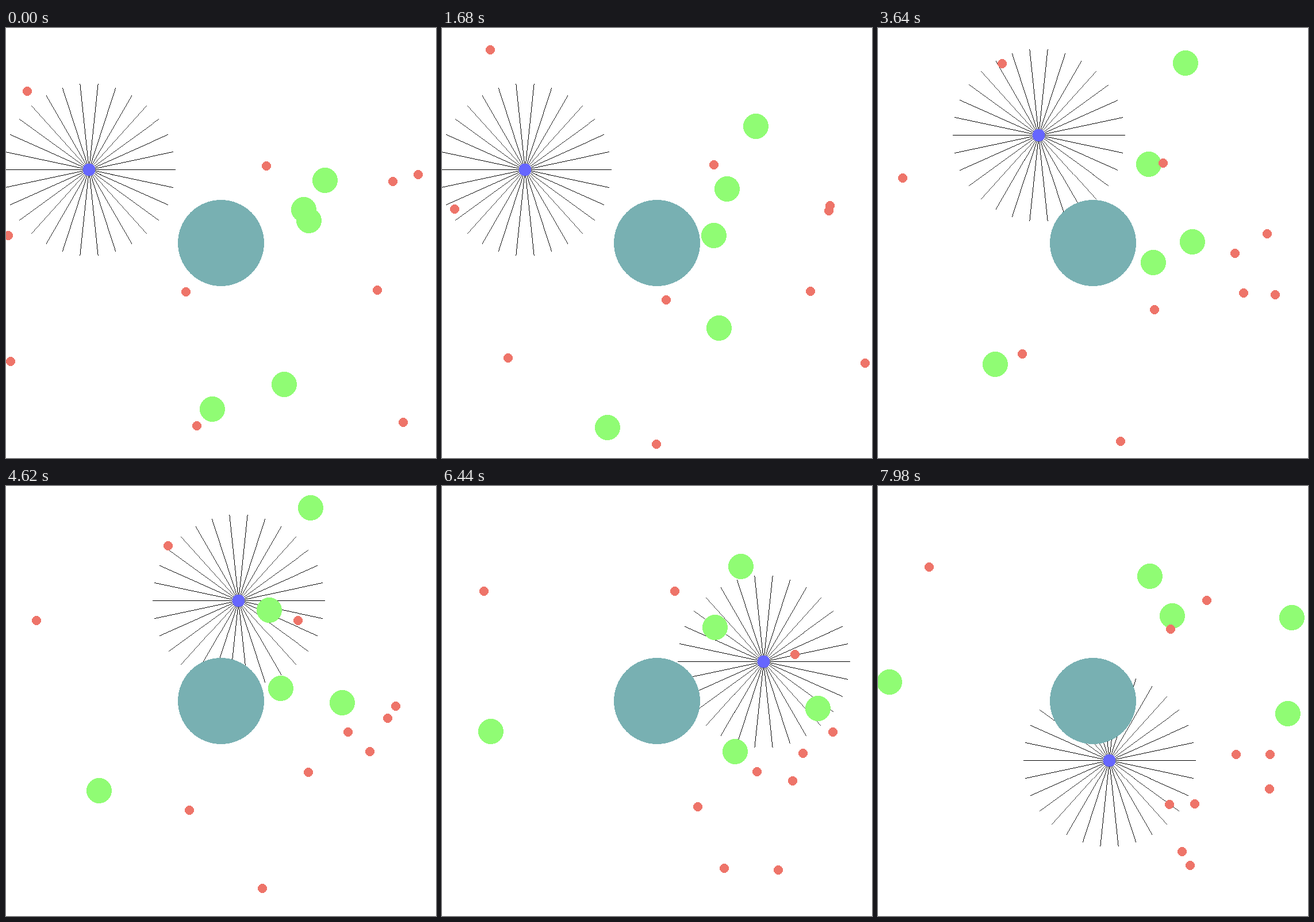
An HTML page for the animation above (8000 ms loop, 748x748 px).

```html
<!DOCTYPE html>
<html lang="en">
<head>
<meta charset="utf-8">
<title>Pursuit</title>
<style>
  html, body { margin: 0; width: 100%; height: 100%; overflow: hidden; background: #fff; }
  svg { display: block; width: 100%; height: 100%; shape-rendering: crispEdges; }
</style>
</head>
<body>
<svg viewBox="0 0 748 748">
  <g id="agent"></g>
  <circle cx="374" cy="374" r="75" fill="#78b0b2"/>
  <g id="food" fill="#90fc74"></g>
  <g id="poison" fill="#ee7469"></g>
</svg>
<script>
const SIZE = 748, STEP_MS = 70, LOOP_MS = 8000;
const CENTER = SIZE / 2, OBSTACLE_R = 75, AGENT_R = 11, RAY_LENGTH = 150, RAYS = 30;

// Bodies start as [x, y, vx, vy], in pixels per step; a caught body takes the next respawn.
const kinds = [
  {
    id: "food", r: 22,
    bodies: [
      [554.5, 265, -0.375, -3.92], [518, 316, -0.909, -1.515], [526.5, 335, -2.46, 1.11],
      [484, 619.5, -0.096, -4.06], [359, 663.2, -2.978, 3.93]
    ],
    respawns: [[583, 541, -3.18, -3.42], [677, 229, 6.13, 0]]
  },
  {
    id: "poison", r: 8,
    bodies: [
      [37.3, 110.3, -4.715, -3.01], [4, 361, 0.745, -1.93], [453, 239.5, 0.826, -0.08],
      [673, 267, 0.08, 1.754], [717, 255, -1.842, 2.627], [313, 458.5, 3.228, 0.597],
      [646, 456, -0.2, 0.096], [8, 580, -4.852, -0.241], [332, 692, 1.728, 1.34],
      [690.6, 686, 1.91, -4.272]
    ],
    respawns: [[616.5, 673.5, -1.94, -0.36]]
  }
];

// The agent rests, then glides smoothly through these [step, x, y] points.
const waypoints = [
  [24, 144.5, 246.5], [36, 174, 220], [52, 279.5, 186.5], [66, 404.9, 199.5],
  [83, 555.5, 257.5], [88, 567, 283], [102, 497.9, 370.5], [114, 402.9, 477.5]
];

function slope(i, axis) {
  const chord = j => (waypoints[j + 1][axis] - waypoints[j][axis]) / span(j);
  const span = j => waypoints[j + 1][0] - waypoints[j][0];
  if (i === 0) return 0;
  if (i === waypoints.length - 1) return chord(i - 1);
  return (chord(i - 1) * span(i) + chord(i) * span(i - 1)) / (span(i - 1) + span(i));
}

function agentAt(step) {
  let i = waypoints.length - 2;
  while (i > 0 && waypoints[i][0] > step) i--;
  const a = waypoints[i], b = waypoints[i + 1], span = b[0] - a[0];
  const u = Math.max(0, (step - a[0]) / span), w = 1 - u;
  return [1, 2].map(k =>
    a[k] * w * w * (1 + 2 * u) + b[k] * u * u * (3 - 2 * u) +
    span * u * w * (slope(i, k) * w - slope(i + 1, k) * u));
}

function bounceOffWalls(body, r) {
  for (const axis of [0, 1]) {
    const speed = Math.abs(body[axis + 2]);
    if (body[axis] < r) body[axis + 2] = speed;
    if (body[axis] > SIZE - r) body[axis + 2] = -speed;
  }
}

function bounceOffObstacle(body, r) {
  const dx = body[0] - CENTER, dy = body[1] - CENTER, distance = Math.hypot(dx, dy);
  const inward = (body[2] * dx + body[3] * dy) / distance;
  if (distance > OBSTACLE_R + r || inward > 0) return;
  body[2] -= 2 * inward * dx / distance;
  body[3] -= 2 * inward * dy / distance;
}

function simulate({ r, bodies, respawns }, steps) {
  const state = bodies.map(body => [...body]);
  let caught = 0;
  for (let step = 1; step <= steps; step++) {
    const [ax, ay] = agentAt(step);
    state.forEach((body, i) => {
      body[0] += body[2];
      body[1] += body[3];
      bounceOffWalls(body, r);
      bounceOffObstacle(body, r);
      const touching = Math.hypot(body[0] - ax, body[1] - ay) < AGENT_R + r;
      if (touching && caught < respawns.length) state[i] = [...respawns[caught++]];
    });
  }
  return state;
}

const byId = id => document.getElementById(id);

function add(parent, tag, attributes) {
  const node = document.createElementNS("http://www.w3.org/2000/svg", tag);
  for (const name in attributes) node.setAttribute(name, attributes[name]);
  return parent.appendChild(node);
}

const agent = byId("agent");
for (let i = 0; i < RAYS; i++) {
  const angle = i * 2 * Math.PI / RAYS;
  const dx = Math.cos(angle), dy = Math.sin(angle);
  add(agent, "line", {
    x2: RAY_LENGTH * dx,
    y2: RAY_LENGTH * dy,
    stroke: "#000",
    // One pixel per row or column, whichever the ray crosses more of.
    "stroke-width": Math.max(Math.abs(dx), Math.abs(dy))
  });
}
add(agent, "circle", { r: AGENT_R, fill: "#6666ff" });

for (const kind of kinds)
  kind.nodes = kind.bodies.map(() => add(byId(kind.id), "circle", { r: kind.r }));

function draw(step) {
  const [x, y] = agentAt(step).map(v => Math.floor(v) + 0.5);
  agent.setAttribute("transform", `translate(${x} ${y})`);
  for (const kind of kinds)
    simulate(kind, step).forEach(([cx, cy], i) => {
      kind.nodes[i].setAttribute("cx", Math.round(cx));
      kind.nodes[i].setAttribute("cy", Math.round(cy));
    });
}

const start = performance.now();
function tick() {
  draw(Math.floor((performance.now() - start) % LOOP_MS / STEP_MS));
  requestAnimationFrame(tick);
}
tick();
</script>
</body>
</html>
```
